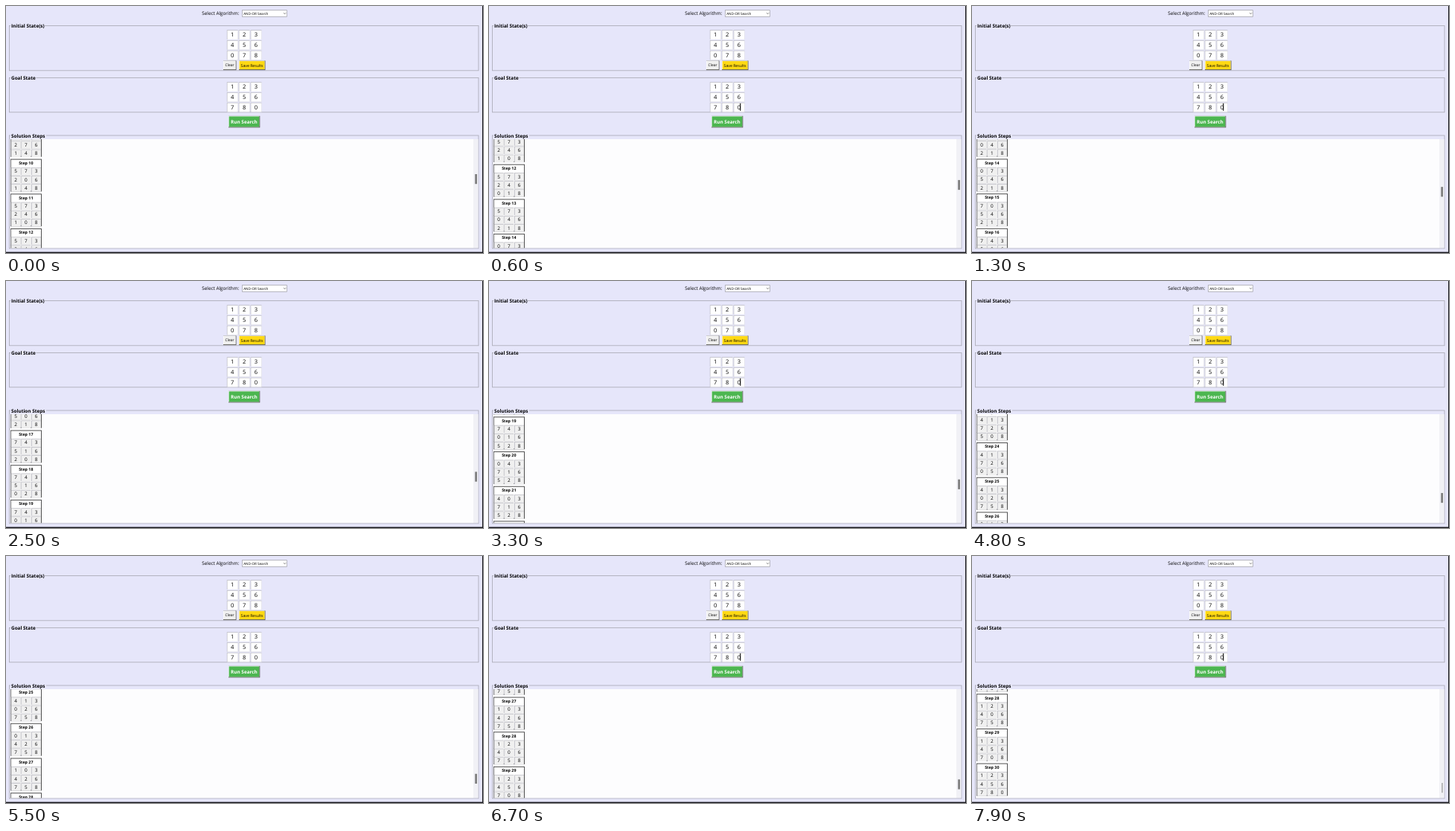
An HTML page for the animation above (8 s loop, 641 px wide and 332 px high).

```html
<!DOCTYPE html>
<html lang="en">
<head>
<meta charset="utf-8">
<title>Puzzle search</title>
<style>
  html, body { margin: 0; width: 100%; height: 100%; overflow: hidden; background: #e6e6fa; }
  svg { display: block; width: 641px; height: 332px; }
  text { font-family: "Open Sans", "Noto Sans", sans-serif; text-rendering: geometricPrecision; white-space: pre; }
</style>
</head>
<body>
<svg id="stage" viewBox="0 0 641 332" xmlns="http://www.w3.org/2000/svg"></svg>
<script>
const LOOP = 8000, TICK = 100;
const PITCH = 46.7, FIRST = 9, FIRST_Y = 211 - PITCH;
const START = "503276148", MOVES = "DDLUURDDLUURDDLUURDDR";
// time in ms, scroll distance in px
const SCROLL = [[0, 0], [1300, 187], [2500, 332], [4200, 569], [5500, 728], [6700, 810], [7900, 861], [8000, 861]];

const rect = (x, y, w, h, fill, more = "") =>
  `<rect x="${x}" y="${y}" width="${w}" height="${h}" fill="${fill}" ${more}/>`;

// y is the middle of the capitals
const text = (s, x, y, size, { bold, mid, fill = "#000" } = {}) =>
  `<text x="${x}" y="${(y + size * 0.357).toFixed(2)}" font-size="${size}" fill="${fill}"` +
  `${bold ? ' font-weight="700"' : ""}${mid ? ' text-anchor="middle"' : ""}>${s}</text>`;

const group = (label, y, bottom, labelWidth) =>
  rect(4.5, y, 630.5, bottom - y, "none", 'stroke="#aeaeba" stroke-width=".9"') +
  rect(6, y - 3, labelWidth, 6, "#e6e6fa") +
  text(label, 7, y + 0.4, 6.4, { bold: true });

const button = (label, x, y, w, h, fill, size, style = {}) =>
  rect(x, y, w, h, "#55554f") +
  rect(x, y, w - 1, h - 1, "#fff") +
  rect(x + 0.6, y + 0.6, w - 1.6, h - 1.6, fill) +
  text(label, x + w / 2 - 0.2, y + h / 2 - 0.1, size, { mid: true, ...style });

const cell = (digit, cx, cy, w, h, fill, size) =>
  rect(cx - w / 2, cy - h / 2, w, h, "#b9b9c0") +
  rect(cx - w / 2 + 0.7, cy - h / 2 + 0.7, w - 0.7, h - 0.7, fill) +
  text(digit, cx, cy, size, { mid: true });

const board = (digits, x, y, dx, dy, w, h, fill, size) =>
  [...digits].map((d, i) =>
    cell(d, x + (i % 3) * dx, y + Math.floor(i / 3) * dy, w, h, fill, size)).join("");

const entryBoard = (digits, y) => board(digits, 304.2, y, 15.9, 13.75, 14.8, 12.6, "#fff", 7.6);

function slide(digits, move) {
  const a = [...digits], from = a.indexOf("0");
  const to = from + { U: -3, D: 3, L: -1, R: 1 }[move];
  [a[from], a[to]] = [a[to], a[from]];
  return a.join("");
}

function stepCard(n, digits) {
  const y = FIRST_Y + (n - FIRST) * PITCH;
  return rect(6, y - 5.4, 42, 43.8, "#505050") +
    rect(6.8, y - 4.4, 40.2, 41.8, "#fff") +
    text("Step " + n, 26.8, y, 5.35, { bold: true, mid: true }) +
    board(digits, 13.1, y + 11.2, 13.7, 11.15, 12.9, 10.4, "#f0f0f0", 6.4);
}

function allSteps() {
  let digits = START, out = stepCard(FIRST, digits);
  [...MOVES].forEach((m, i) => {
    digits = slide(digits, m);
    out += stepCard(FIRST + 1 + i, digits);
  });
  return out;
}

const stage = document.getElementById("stage");
stage.innerHTML =
  '<clipPath id="view"><rect x="5" y="179" width="623" height="146.3"/></clipPath>' +
  rect(0, 0, 641, 332, "#e6e6fa") +
  text("Select Algorithm:", 263.3, 10.2, 6.35) +
  rect(317.5, 5.7, 60, 8.6, "#fff", 'stroke="#9c9ca4" stroke-width=".7"') +
  text("AND-OR Search", 319.2, 10, 4.6) +
  '<path d="M373.2 9.2l1.5 1.5 1.5-1.5" fill="none" stroke="#444" stroke-width=".7"/>' +
  group("Initial State(s)", 26.5, 86.8, 46) +
  entryBoard("123456078", 38.6) +
  button("Clear", 292, 73.5, 17.5, 12.6, "#f0f0f0", 5) +
  button("Save Results", 313, 73.5, 35.5, 12.6, "#ffd913", 5.2) +
  group("Goal State", 96.5, 142.8, 34.5) +
  entryBoard("123456780", 108.6) +
  rect(337.2, 130.8, 1.1, 10, "#000", 'id="caret"') +
  button("Run Search", 299, 147.8, 42.3, 15.6, "#4cb650", 6.4, { bold: true, fill: "#fff" }) +
  group("Solution Steps", 174, 325.8, 48) +
  rect(5.5, 179, 622.5, 146.3, "#fdfdfe") +
  rect(628, 179, 6.5, 146.3, "#f1f1f6") +
  `<g clip-path="url(#view)"><g id="steps">${allSteps()}</g></g>` +
  rect(630.2, 226, 2.8, 13.2, "#808080", 'id="thumb"') +
  rect(640, 0, 1, 332, "#15151a") +
  rect(0, 330.6, 641, 1.4, "#15151a");

const [steps, thumb, caret] = ["steps", "thumb", "caret"].map(id => document.getElementById(id));

function scrollAt(t) {
  const i = SCROLL.findIndex(([end]) => end > t);
  const [t0, s0] = SCROLL[i - 1], [t1, s1] = SCROLL[i];
  return s0 + (s1 - s0) * (t - t0) / (t1 - t0);
}

function draw(now) {
  const t = Math.floor((now % LOOP) / TICK) * TICK;
  const s = scrollAt(t);
  const thin = t >= 7600;
  steps.setAttribute("transform", `translate(0 ${-s.toFixed(2)})`);
  thumb.setAttribute("y", (226 + s * 79 / 861).toFixed(2));
  thumb.setAttribute("x", thin ? 631.4 : 630.2);
  thumb.setAttribute("width", thin ? 1 : 2.8);
  caret.setAttribute("visibility", (t + 290) % 925 < 305 ? "hidden" : "visible");
}

function frame() {
  draw(performance.now());
  requestAnimationFrame(frame);
}
frame();
</script>
</body>
</html>
```
